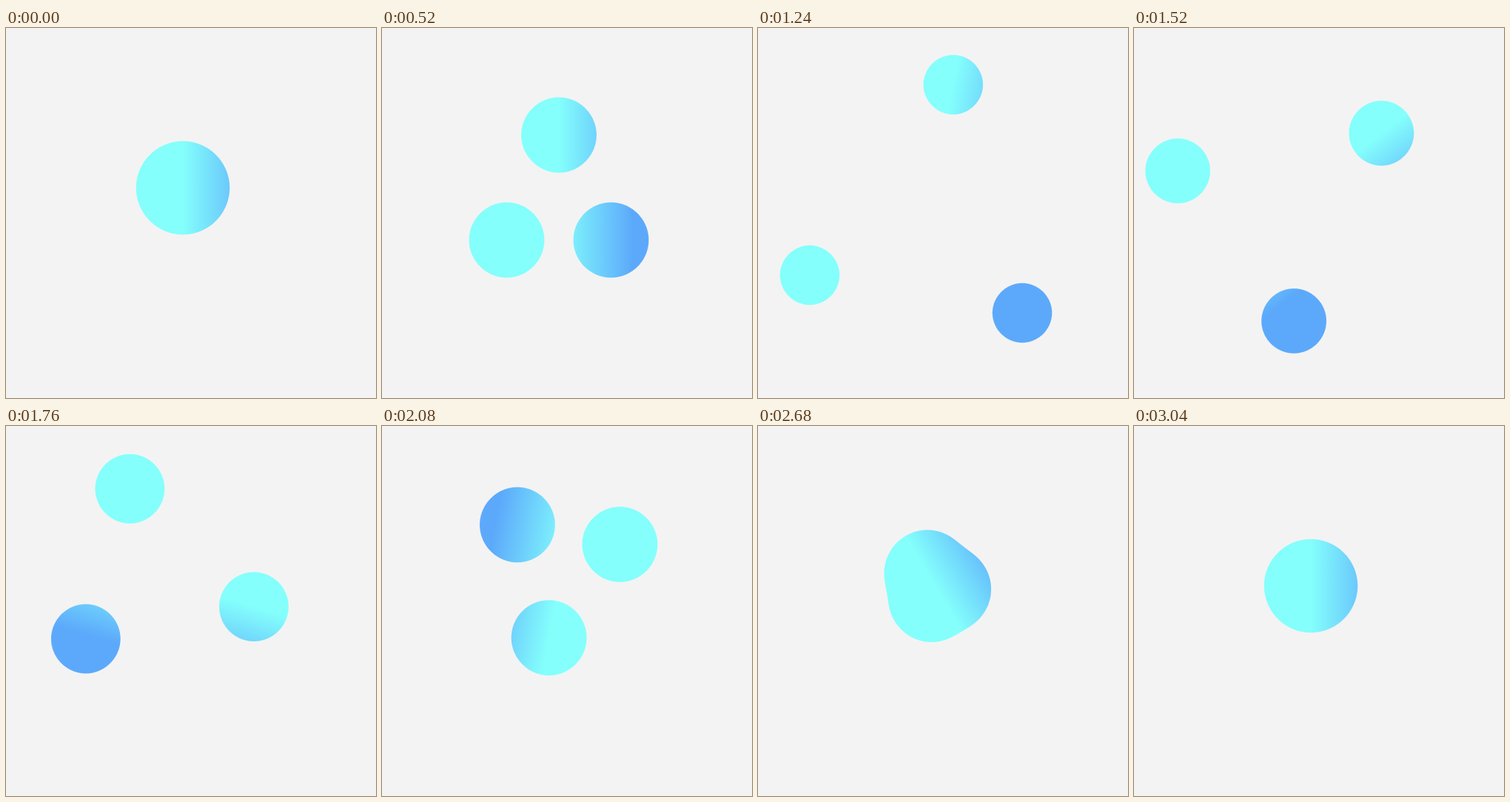
These frames come from a looping animation (500x500 px, 3080 ms). An HTML page:

```html
<!DOCTYPE html>
<html lang="en">
<head>
<meta charset="utf-8">
<title>Three drops</title>
<style>
  html, body { margin: 0; width: 100%; height: 100%; overflow: hidden; background: #f3f3f3; }
  svg { display: block; width: 100vw; height: 100vh; }
</style>
</head>
<body>
<svg viewBox="0 0 500 500">
  <defs>
    <linearGradient id="tint" gradientUnits="userSpaceOnUse" x1="0" y1="0" x2="100" y2="0">
      <stop offset="0" stop-color="#84fffc"/>
      <stop offset="1" stop-color="#5ca9fb"/>
    </linearGradient>
    <!-- Blur, then cut at half opacity so that near drops flow together -->
    <filter id="goo" filterUnits="userSpaceOnUse" x="0" y="0" width="500" height="500" color-interpolation-filters="sRGB">
      <feGaussianBlur stdDeviation="11"/>
      <feColorMatrix values="0 0 0 0 1  0 0 0 0 1  0 0 0 0 1  0 0 0 27.5 -13.25"/>
    </filter>
    <mask id="drops" maskUnits="userSpaceOnUse" x="0" y="0" width="500" height="500">
      <g filter="url(#goo)" fill="#fff">
        <circle/><circle/><circle/>
      </g>
    </mask>
  </defs>
  <rect width="500" height="500" fill="#f3f3f3"/>
  <rect width="500" height="500" fill="url(#tint)" mask="url(#drops)"/>
</svg>
<script>
const LOOP = 3080, STEP = 40;
const REST = 40, OPEN = 1000, CLOSE = 2000;
const CX = 239, CY = 216, REACH = 150, BLUR = 11;

const tint = document.getElementById('tint');
const circles = document.querySelectorAll('circle');

const clamp = v => Math.min(1, Math.max(0, v));
const smooth = v => v * v * (3 - 2 * v);

// Cubic ease with handles of one sixth, solved by bisection
function softEase(x) {
  let lo = 0, hi = 1;
  for (let i = 0; i < 30; i++) {
    const p = (lo + hi) / 2, q = 1 - p;
    if (q * q * p / 2 + 2.5 * q * p * p + p * p * p < x) lo = p; else hi = p;
  }
  return smooth((lo + hi) / 2);
}

function draw(time) {
  const t = Math.floor((time % LOOP) / STEP) * STEP;
  const back = clamp((t - REST - OPEN) / CLOSE);
  const spread = clamp((t - REST) / OPEN) - back;

  const turn = 2 * Math.PI * smooth(back);
  const cos = Math.cos(turn), sin = Math.sin(turn);
  const side = REACH * smooth(spread);
  const top = REACH * softEase(spread);
  const seen = 62.9 - 25.2 * spread;
  const radius = seen + BLUR * BLUR / (2 * seen); // makes up for the loss in the blur

  [[0, -top], [-side, side], [side, side]].forEach(([x, y], i) => {
    const c = circles[i];
    c.setAttribute('cx', CX + x * cos - y * sin);
    c.setAttribute('cy', CY + x * sin + y * cos);
    c.setAttribute('r', radius);
  });
  tint.setAttribute('gradientTransform',
    `translate(${CX} ${CY}) rotate(${turn * 180 / Math.PI})`);
}

let start;
function tick(now) {
  if (start === undefined) start = now;
  draw(now - start);
  requestAnimationFrame(tick);
}
draw(0);
requestAnimationFrame(tick);
</script>
</body>
</html>
```
